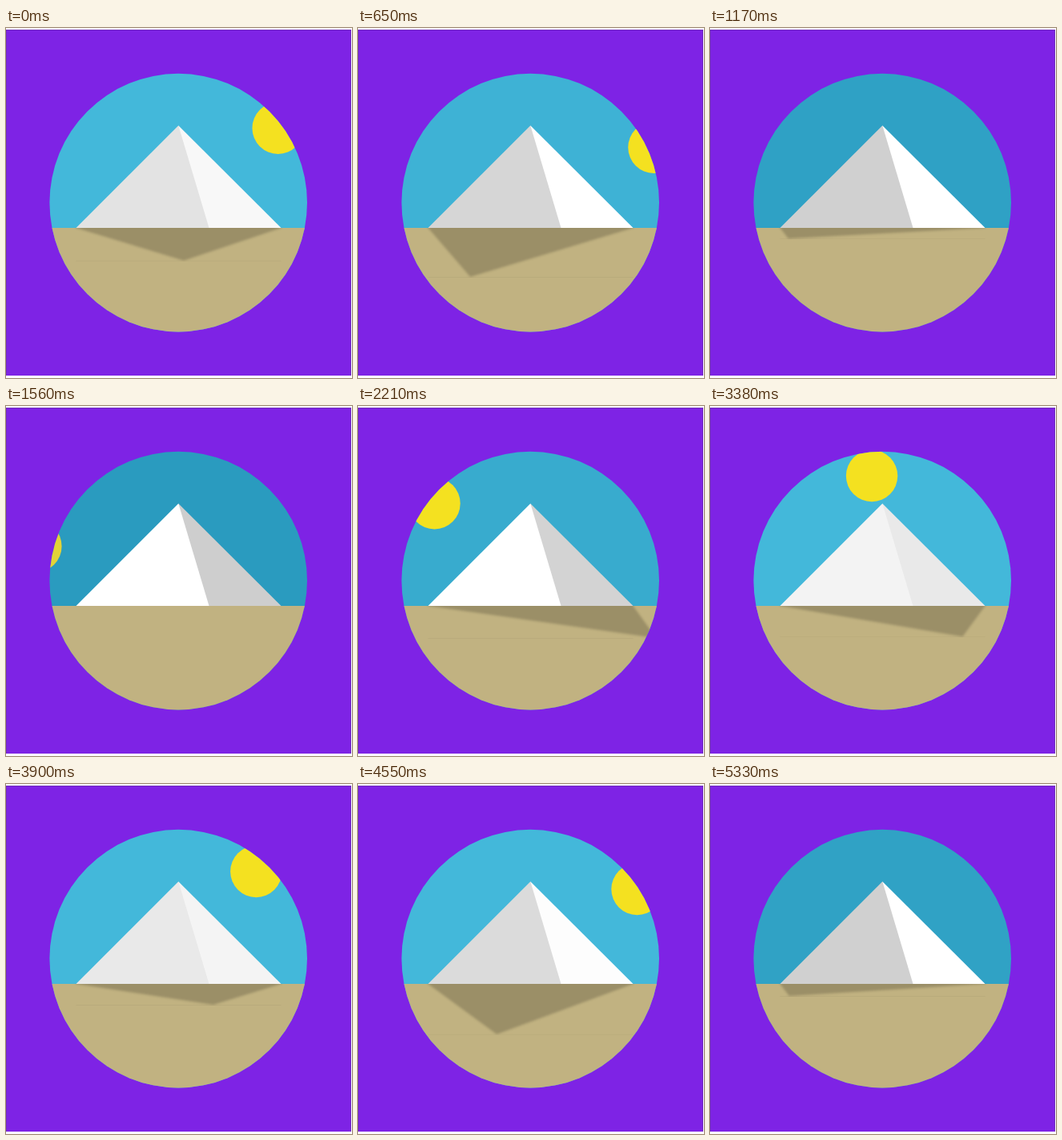
These frames come from a looping animation (432x436 px, 5.46 s). An HTML page with a canvas:

```html
<!DOCTYPE html>
<html lang="en">
<head>
<meta charset="utf-8">
<title>Pyramid</title>
<style>
  html, body { margin: 0; width: 100%; height: 100%; overflow: hidden; background: #fff; }
  canvas { display: block; }
</style>
</head>
<body>
<canvas id="stage" width="432" height="436"></canvas>
<script>
const ctx = document.getElementById('stage').getContext('2d');
const LOOP = 5460, DAY = 4180, DAWN_OFFSET = 0.63;
const GROUND = 249, LEFT = 87.5, RIGHT = 343.5;
const APEX = [215.3, 121.5], RIDGE = [253.5, GROUND];

const clamp = v => Math.min(1, Math.max(0, v));
const lerp = (a, b, k) => a + (b - a) * k;
const smooth = v => { const k = clamp(v); return k * k * (3 - 2 * k); };
const mix = (a, b, k) => `rgb(${a.map((v, i) => Math.round(lerp(v, b[i], k)))})`;

// cubic-bezier(.4, 0, .49, 1)
function ease(x) {
  let lo = 0, hi = 1;
  for (let i = 0; i < 24; i++) {
    const t = (lo + hi) / 2, u = 1 - t;
    if (3 * u * u * t * 0.4 + 3 * u * t * t * 0.49 + t * t * t < x) lo = t;
    else hi = t;
  }
  return smooth(lo);
}

// Eases from value to value between the given stops.
function keyed(p, stops, values) {
  let i = 0;
  while (i < stops.length - 2 && p >= stops[i + 1]) i++;
  return lerp(values[i], values[i + 1], ease((p - stops[i]) / (stops[i + 1] - stops[i])));
}

// All of these take the day progress, 0 to 1.
const sunAngle = p => keyed(p, [0, 0.3, 0.7, 1], [-52.7, -20.2, 36.4, 73]) * Math.PI / 180;
const daylight = p => smooth(Math.min(p, 1 - p) / 0.3);
const faceLight = p => Math.round(206 + 49 * smooth(p / 0.82));
const shadowHeight = p => 64 * keyed(p, [0, 0.3, 0.55, 0.75, 1], [0, 1, 0.4, 1, 0]);

function shadowTip(p) {
  const swing = (1 - Math.cos(Math.PI * clamp((p - 0.28) / 0.72))) / 2;
  return lerp(345, 88, swing) + 225 * Math.max(0, 0.28 - p);
}

function poly(color, ...points) {
  ctx.fillStyle = color;
  ctx.beginPath();
  points.forEach(p => ctx.lineTo(...p));
  ctx.fill();
}

function rect(color, x, y, w, h) {
  ctx.fillStyle = color;
  ctx.fillRect(x, y, w, h);
}

function circle(x, y, r) {
  ctx.beginPath();
  ctx.arc(x, y, r, 0, Math.PI * 2);
}

function drawSun(p) {
  const a = sunAngle(p);
  circle(215 + 223.3 * Math.sin(a), 310 - 223.3 * Math.cos(a), 32.2);
  ctx.fillStyle = mix([226, 211, 56], [244, 225, 32], clamp(2 * daylight(p)));
  ctx.fill();
}

function drawShadow(p) {
  const h = shadowHeight(p);
  if (h < 0.5) return;
  ctx.save();
  ctx.beginPath();
  ctx.rect(0, GROUND, 432, h + 1);
  ctx.clip();
  ctx.filter = 'blur(1.5px)';
  poly('rgba(0,0,0,.195)', [LEFT, 238], [LEFT, GROUND], [shadowTip(p), GROUND + h], [RIGHT, GROUND], [RIGHT, 238]);
  ctx.filter = 'none';
  rect('rgba(0,0,0,.045)', LEFT, GROUND + h, RIGHT - LEFT, 1);
  ctx.restore();
}

function drawPyramid(p) {
  const gray = v => `rgb(${v},${v},${v})`;
  poly(gray(faceLight(p)), APEX, [RIGHT, GROUND], [LEFT + 100, GROUND]);
  poly(gray(faceLight(1 - p)), APEX, RIDGE, [LEFT, GROUND]);
}

function draw(p) {
  rect('#fff', 0, 0, 432, 436);
  rect('#6f2bbd', 0, 2, 431, 431);
  rect('#7e23e5', 1, 3, 429, 430);

  ctx.save();
  circle(215.2, 217.6, 160.8);
  ctx.clip();
  rect(mix([42, 155, 191], [67, 184, 218], daylight(p)), 0, 0, 432, 436);
  drawSun(p);
  rect('#c1b281', 0, GROUND, 432, 200);
  drawShadow(p);
  drawPyramid(p);
  ctx.restore();
}

const start = performance.now();
function tick() {
  const ms = (performance.now() - start) % LOOP;
  draw((DAWN_OFFSET + ms / DAY) % 1);
  requestAnimationFrame(tick);
}
tick();
</script>
</body>
</html>
```
